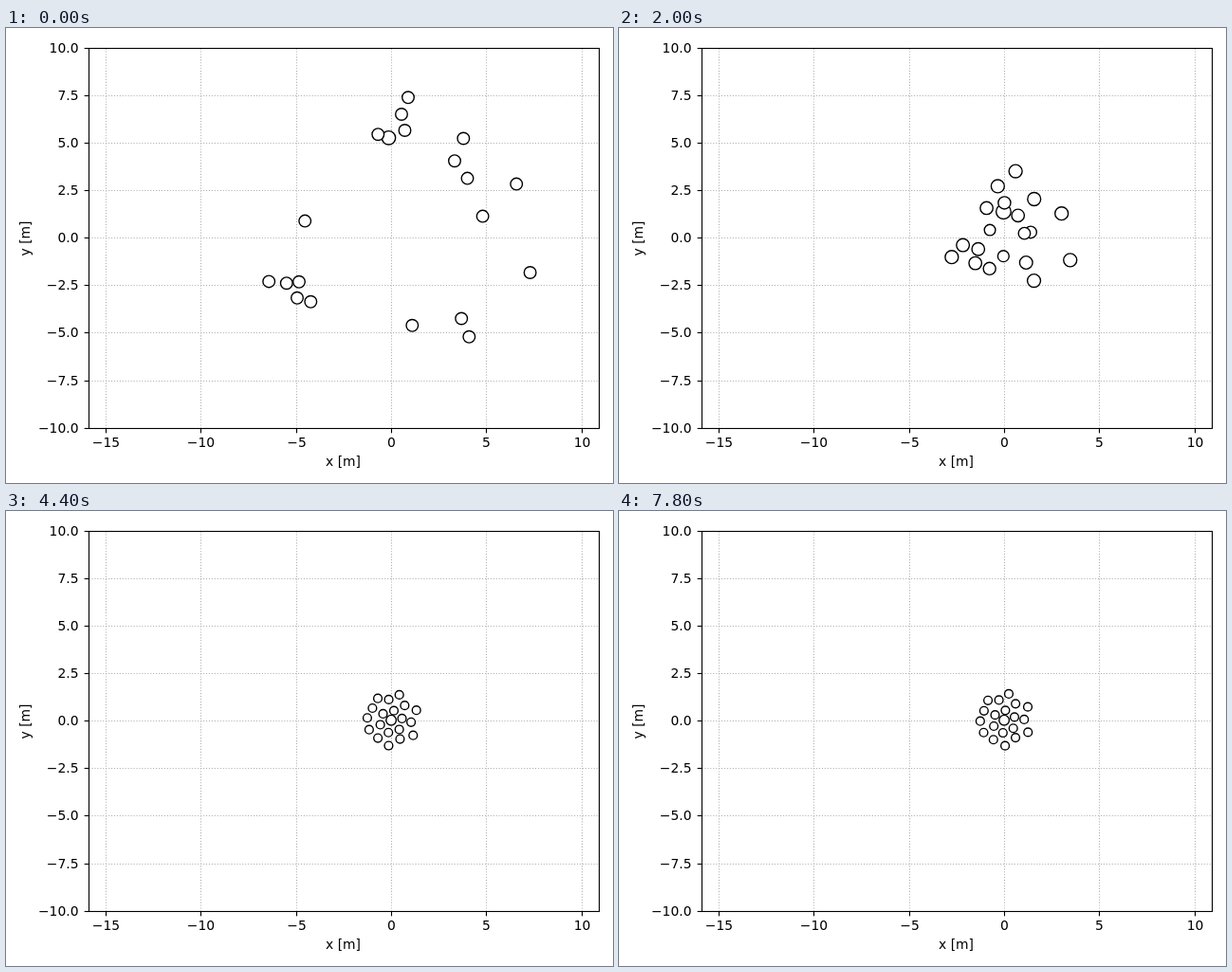
Write an HTML page with a canvas that moves like this. It is 640 px wide and 480 px high and loops after 8 s.

```html
<!DOCTYPE html>
<html lang="en">
<head>
<meta charset="utf-8">
<title>Swarm gathering</title>
<style>
  html, body { margin: 0; width: 100%; height: 100%; overflow: hidden; background: #fff; }
  canvas { display: block; }
</style>
</head>
<body>
<canvas id="stage" width="640" height="480"></canvas>
<script>
const ctx = document.getElementById('stage').getContext('2d');
const LOOP = 8000, STEP = 200;
const SPEED = 39;        // pixels per second
const BRAKING = 5;       // pixels over which an agent slows down
const RING = 13, HEXAGON = 6;
const box = { left: 87.5, top: 21.5, right: 625.5, bottom: 422.5 };
const center = { x: 406.1, y: 220.7 };

// Starting places: the middle agent, then the outer ring, then the inner hexagon.
const starts = [
  [403.5, 115.8],
  [486.5, 158.6], [552.6, 258], [488.3, 325.8], [428.3 - 107, 288.8], [307, 284.8],
  [277.2, 267.4], [295.8, 269.2], [392.3, 112.2], [417, 91], [420.5, 108],
  [424, 73.3], [482.3, 116.5], [538.2, 164.6],
  [502.6, 198.6], [480.2, 306.5], [428.3, 313.8], [309, 267.8], [315.2, 203.6], [473, 140.2]
];

const radians = degrees => degrees * Math.PI / 180;

// Resting place of an agent relative to the center, for a given turn of the cluster.
function restOffset(i, turn) {
  if (i === 0) return { x: 0, y: 0 };
  let angle, distance, shift = 0;
  if (i <= RING) {
    angle = radians(7.5 + (i - 1) * 360 / RING);
    angle -= 0.12 * Math.cos(angle);
    distance = 24.8 + 3.8 * Math.cos(i * 12 * Math.PI / RING);
  } else {
    angle = radians((i - RING - 1) * 360 / HEXAGON - 21);
    distance = 11.9;
    shift = 1.5;
  }
  return {
    x: distance * Math.cos(angle + turn),
    y: distance * Math.sin(angle + turn) + shift
  };
}

// Each agent heads straight for its resting place and brakes on arrival.
function agentAt([startX, startY], i, seconds) {
  const turn = 0.04 * (6.6 - Math.max(seconds, 4.2));
  const rest = restOffset(i, turn);
  const x = center.x + rest.x, y = center.y + rest.y;
  const path = Math.hypot(startX - x, startY - y);
  const ahead = path - SPEED * seconds;
  const left = BRAKING * Math.log1p(Math.exp(ahead / BRAKING));
  const cruiseRadius = 6.3 + 0.7 * Math.min(1, seconds / 1.2);
  const restRadius = 4.4;
  const extra = i === 0 ? 0.9 : 0;
  return {
    x: x + (startX - x) * left / path,
    y: y + (startY - y) * left / path,
    r: restRadius + extra + (cruiseRadius - restRadius) * (1 - Math.exp(-left / 8))
  };
}

function line(x1, y1, x2, y2) {
  ctx.beginPath();
  ctx.moveTo(x1, y1);
  ctx.lineTo(x2, y2);
  ctx.stroke();
}

function gridLine(...ends) {
  ctx.strokeStyle = '#b0b0b0';
  ctx.setLineDash([1.11, 1.83]);
  line(...ends);
  ctx.strokeStyle = '#000';
  ctx.setLineDash([]);
}

const label = (value, digits) => value.toFixed(digits).replace('-', '\u2212');

function drawAxes() {
  ctx.fillStyle = '#000';
  ctx.lineWidth = 1.11;
  ctx.font = '13.89px "DejaVu Sans", sans-serif';

  ctx.textAlign = 'center';
  for (let v = -15; v <= 10; v += 5) {
    const x = Math.floor(406.5 + v * 20.06) + 0.5;
    gridLine(x, box.bottom, x, box.top);
    line(x, box.bottom, x, box.bottom + 4.86);
    ctx.fillText(label(v, 0), x, 442);
  }
  ctx.fillText('x [m]', 355.5, 462);

  ctx.textAlign = 'right';
  for (let v = -10; v <= 10; v += 2.5) {
    const y = Math.floor(221.62 - v * 20.06) + 0.5;
    gridLine(box.left, y, box.right, y);
    line(box.left, y, box.left - 4.86, y);
    ctx.fillText(label(v, 1), 76.5, y + 4.8);
  }

  ctx.save();
  ctx.translate(25, 222);
  ctx.rotate(-Math.PI / 2);
  ctx.textAlign = 'center';
  ctx.fillText('y [m]', 0, 0);
  ctx.restore();

  ctx.strokeRect(box.left, box.top, box.right - box.left, box.bottom - box.top);
}

function drawAgent({ x, y, r }) {
  ctx.beginPath();
  ctx.arc(x, y, r, 0, 2 * Math.PI);
  ctx.fill();
  ctx.stroke();
}

function draw(elapsed) {
  const seconds = Math.floor((elapsed % LOOP) / STEP) * STEP / 1000;
  ctx.fillStyle = '#fff';
  ctx.fillRect(0, 0, 640, 480);
  drawAxes();
  ctx.fillStyle = '#fff';
  ctx.lineWidth = 1.39;
  starts.forEach((start, i) => drawAgent(agentAt(start, i, seconds)));
}

const begin = performance.now();
function tick() {
  draw(performance.now() - begin);
  requestAnimationFrame(tick);
}
tick();
</script>
</body>
</html>
```
